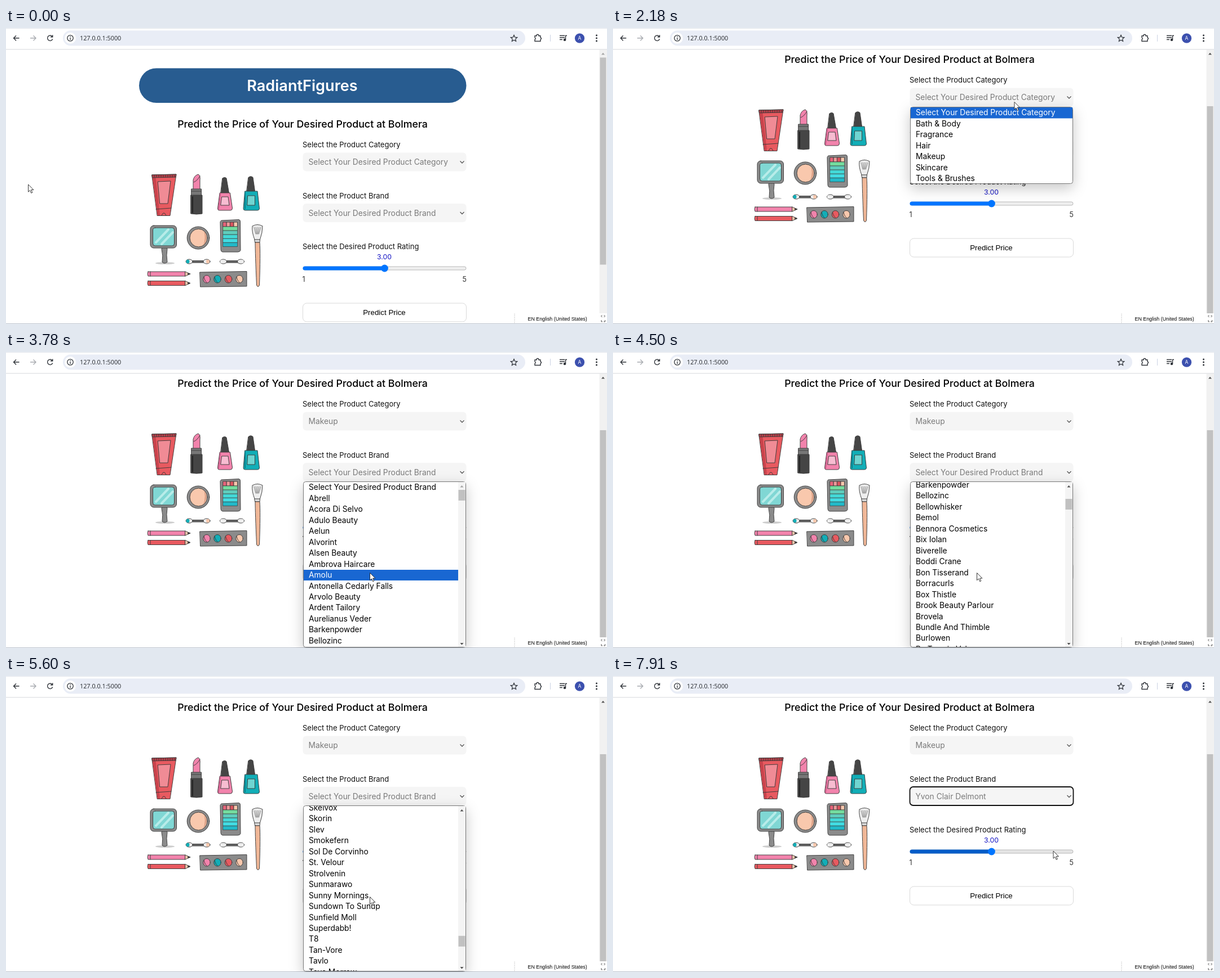
Write an HTML page that moves like this. It is 1066 px wide and 526 px high and loops after 8 s.

```html
<!DOCTYPE html>
<html lang="en">
<head>
<meta charset="utf-8">
<title>Price predictor</title>
<style>
html, body { margin: 0; width: 100%; height: 100%; overflow: hidden; background: #fff; }
svg { position: fixed; left: 0; top: 0; width: 100%; height: 100%; display: block; }
text { font-family: Inter, "Open Sans", sans-serif; fill: #111; white-space: pre; }
.label { font-size: 13px; }
.pick { font-size: 13.8px; fill: #7a7a7a; }
.item { font-size: 13.8px; fill: #000; }
.item.on { fill: #fff; }
.arial { font-family: "Liberation Sans", Arial, sans-serif; fill: #000; }
.ink { stroke: #3c3c3c; stroke-width: .95; stroke-linejoin: round; stroke-linecap: round; }
.icon { fill: none; stroke: #30343a; stroke-width: 1.4; }
.pop { filter: drop-shadow(0 8px 12px rgba(0,0,0,.22)); }
</style>
</head>
<body>
<svg id="stage" viewBox="0 0 1066 526" preserveAspectRatio="none"></svg>
<script>
const LOOP = 8000, ROW = 19.46, COUNT = 221, BLUE = '#1967d2';
const stage = document.getElementById('stage');
const $ = id => document.getElementById(id);

const rect = (x, y, w, h, fill, more = '') =>
  `<rect x="${x}" y="${y}" width="${w}" height="${h}" fill="${fill}" ${more}/>`;
const path = (d, fill = 'none', more = '') => `<path d="${d}" fill="${fill}" ${more}/>`;
const oval = (x, y, rx, ry, fill, more = '') =>
  `<ellipse cx="${x}" cy="${y}" rx="${rx}" ry="${ry}" fill="${fill}" ${more}/>`;
const text = (x, y, s, more = '') => `<text x="${x}" y="${y}" ${more}>${s}</text>`;

// ---- names in the lists ----
const cats = ['Select Your Desired Product Category', 'Bath &amp; Body', 'Fragrance', 'Hair',
  'Makeup', 'Skincare', 'Tools &amp; Brushes'];
const head = ('Select Your Desired Product Brand,Abrell,Acora Di Selvo,Adulo Beauty,Aelun,Alvorint,' +
  'Alsen Beauty,Ambrova Haircare,Amolu,Antonella Cedarly Falls,Arvolo Beauty,Ardent Tailory,' +
  'Aurelianus Veder,Barkenpowder,Bellozinc,Bellowhisker,Bemol,Bennora Cosmetics,Bix Iolan,' +
  'Biverelle,Boddi Crane,Bon Tisserand,Borracurls,Box Thistle,Brook Beauty Parlour,Brovela,' +
  'Bundle And Thimble,Burlowen,By Tamsin Vale').split(',');
const middle = ('Skelvox,Skorin,Slev,Smokefern,Sol De Corvinho,St. Velour,Strolvenin,Sunmarawo,' +
  'Sunny Mornings,Sundown To Sunup,Sunfield Moll,Superdabb!,T8,Tan-Vore,Tavlo,Tava Morrow').split(',');
const tail = ('Torvelle,Tulva Hair,Ulmera,Umbrel Skin,Varnelle,Velunda,Vistro Beauty,Wendrow,' +
  'Whitlow Fern,Wilmere,Xandrel,Yarrowin,Yelmora,Youngfell Labs,Yvon Clair Delmont').split(',');
const MID = 179, TAIL = COUNT - tail.length;

function brand(i) {
  if (i < head.length) return head[i];
  if (i >= TAIL) return tail[i - TAIL] || '';
  if (i >= MID && i < MID + middle.length) return middle[i - MID];
  const letter = i < MID ? String.fromCharCode(67 + Math.floor((i - 29) / 150 * 17)) : 'T';
  return letter + 'aeou'[i * 7 % 4] + ['lv', 'rsk', 'ndr', 'mbl', 'xt'][i * 3 % 5] +
    ['ane', 'ilo', 'ume', 'ora', 'eth', 'y'][i * 5 % 6] + (i % 4 ? '' : ' Beauty');
}

// ---- drawing of the cosmetics ----
function cosmetics() {
  const pink = '#f283ac', red = '#e85a60', teal = '#12aeb7', grey = '#8b8b8b', dark = '#454545', peach = '#f9c8ad';
  let s = '';
  // tube
  s += path('M259 261L302 260 291 333.5H268.500Z', red) +
    path('M259 261L265 261 273 333H268.500Z', '#c9434c', 'stroke="none"') +
    path('M259 261L302 260 301 265 260 266Z', '#b93e48');
  for (let x = 263; x < 300; x += 4) s += path(`M${x} 261.500v3.500`);
  s += path('M269.500 273L292 272 287 312H273Z', '#f08b95') + path('M266 322L293 320M276 333q4-9 8 0');
  // lipstick
  s += path('M332 287V270Q334 262 341 260Q345 262 344 270V287Z', pink) +
    path('M333 274Q339 272 344 263') +
    path('M329 286H346.500V298H329Z', '#777') + path('M328 297H348V330Q338 332 328 330Z', dark) +
    path('M331 300V328', 'none', 'style="stroke:#222;stroke-width:2"') + path('M329 290H346');
  // nail polish
  s += path('M384 267Q388 264 391 267L395.500 293H381Z', dark) +
    path('M379.500 293H397.500L401.500 320Q401.500 324 398 324H378.500Q375 324 375.500 320Z', pink) +
    path('M380 294L377 322', 'none', 'style="stroke:#c75c88;stroke-width:2"') +
    path('M383 300H394L396 315H381Z', '#f7bcd1');
  s += path('M430 265.500Q434 262 438 265.500L441.500 290H427Z', dark) +
    path('M424 290H446L449.500 321Q449 324 446 324H424Q421 324 421 321Z', teal) +
    path('M424 292V321', 'none', 'style="stroke:#087f8a;stroke-width:2"') +
    path('M429 298H441.500V315H428Z', '#70d5d1');
  // mirror
  s += oval(282, 418, 17, 2, '#ccc', 'stroke="none"') +
    path('M277 388L276 393Q279 405 277 416Q281 420 286 416Q284 403 286 393L285 388Z', grey) +
    rect(256, 351, 46.5, 40, grey, 'rx="6"') + rect(260.5, 355, 38, 32, '#80d7d4', 'rx="4"') +
    path('M266 381L288 358M276 384L296 363', 'none', 'style="stroke:#b8ece9;stroke-width:4"');
  // compact
  s += oval(341, 373, 19.8, 20, grey) + oval(341.5, 373, 15.5, 16, peach) +
    path('M351 361Q360 373 350 386Q355 373 351 361Z', '#d99d83', 'stroke="none"');
  // shade card
  s += path('M382 342L413 340.500Q416 341 415.500 345L416 395Q415 398 411 398H384Q381 397 381 394L380 345Z', grey);
  ['#e7647b', '#ef9a9a', '#d9555f', peach].forEach((c, i) => s += rect(385 + i * 6.4, 345, 6.4, 8, c));
  ['#74dd9f', '#5fcdbd', '#43d9d7', '#42dbe2', '#22b9c8'].forEach((c, i) =>
    s += rect(385, 353 + i * 7.1, 25.6, 7.1, c, 'stroke-width=".7"'));
  // brush
  s += path('M441 376Q435.500 362 437 352Q446 347 455 352Q455 364 450.500 376Z', '#eee');
  for (let i = 0; i < 5; i++) s += path(`M${440 + i * 3} 354L${443 + i * 1.3} 366`, 'none', 'stroke-width=".6"');
  s += path('M441 376H450.500L450 381H442Z', '#ddd') +
    path('M442 381H450Q451.500 400 449.500 457Q447 462 444.500 457Q442 400 442 381Z', '#f0b797');
  // applicators
  [[319, teal, peach], [379.5, '#eee', '#eee']].forEach(([x, a, b]) =>
    s += path(`M${x + 10} 413.500H${x + 33}V417H${x + 10}Z`, '#666') +
      oval(x + 6, 415, 6, 4, '#eee') + oval(x + 37, 415, 6, 4, '#eee') +
      oval(x + 3.5, 415, 3, 3.2, a, 'stroke="none"') + oval(x + 39, 415, 3, 3.2, b, 'stroke="none"'));
  // pencils
  [[433, pink], [449.500, red]].forEach(([y, c]) =>
    s += path(`M252 ${y}H318V${y + 8}H252Q250 ${y + 4} 252 ${y}Z`, c) +
      path(`M318 ${y}L326.500 ${y + 4}L318 ${y + 8}Z`, peach) +
      path(`M323 ${y + 2.500}L327 ${y + 4}L323 ${y + 5.500}Z`, dark) + path(`M256 ${y}V${y + 8}`));
  // eye shadows
  s += path('M344 434L427 432.500V459L345 460Z', grey);
  [[356, pink], [375, teal], [394.500, red], [414, peach]].forEach(([x, c]) =>
    s += oval(x, 446.3, 6.3, 6.8, c) + path(`M${x - 5} 442Q${x - 4} 449 ${x} 452`));
  return `<g class="ink">${s}</g>`;
}

// ---- page parts ----
function select(id, y, label) {
  return text(526, y - 9.5, label, 'class="label"') +
    rect(526.5, y, 290, 33, '#f5f5f5', `rx="6" id="${id}Box"`) +
    text(536.500, y + 21.5, '', `class="pick" id="${id}"`) +
    path(`M805.500 ${y + 15}l3.500 3.500 3.500-3.500`, 'none', 'stroke="#555" stroke-width="1.300"');
}

function page() {
  return rect(236, 71.5, 580.5, 61.5, '#285c90', 'rx="30.750"') +
    text(525.5, 112, 'RadiantFigures', 'font-size="27.100" font-weight="600" text-anchor="middle" style="fill:#fff"') +
    text(526, 177, 'Predict the Price of Your Desired Product at Bolmera',
      'font-size="17.800" font-weight="500" text-anchor="middle" style="fill:#000"') +
    cosmetics() +
    select('cat', 221.5, 'Select the Product Category') +
    select('brand', 312, 'Select the Product Brand') +
    text(526, 393, 'Select the Desired Product Rating', 'class="label"') +
    text(671, 410.8, '3.00', 'font-size="12.300" text-anchor="middle" style="fill:#1414c4"') +
    rect(527, 424, 289, 6, '#efefef', 'rx="3" stroke="#b2b2b2" stroke-width=".900" id="track"') +
    rect(526.5, 423.5, 145, 7, '#0075ff', 'rx="3.500" id="fill"') +
    oval(671.5, 427, 6.4, 6.4, '#0075ff') +
    text(525.5, 451, '1', 'font-size="12.500" style="fill:#333"') +
    text(817, 451, '5', 'font-size="12.500" text-anchor="end" style="fill:#333"') +
    rect(526.5, 489, 290, 33, '#fff', 'rx="7" stroke="#d9d9d9"') +
    text(671, 510, 'Predict Price', 'class="arial" font-size="13.330" text-anchor="middle"');
}

function toolbar() {
  const dots = [13, 18, 23].map(y => oval(1047.5, y, 1.5, 1.5, '#30343a')).join('');
  return rect(0, 0, 1066, 38, '#fff') + rect(0, 0, 1066, 1, '#dfe3ea') + rect(0, 37.5, 1066, 1, '#d6d8dc') +
    rect(101, 4.5, 820, 27, '#e9edf6', 'rx="13.500"') + oval(114, 18, 10, 10, '#fff') +
    '<g class="icon">' +
    path('M23.500 18H13.500M18 13.500L13.500 18L18 22.500') +
    path('M43 18H53M48.500 13.500L53 18L48.500 22.500', 'none', 'stroke="#a8abb0"') +
    path('M82 15A4.700 4.700 0 1 0 82.700 19.500M82.700 12.500V16H79') +
    oval(114, 18, 5.2, 5.2, 'none', 'stroke-width="1.300"') + path('M114 17.500V21M114 14.800V16.200') +
    path('M901 12.500L902.700 16.400L906.800 16.800L903.700 19.500L904.600 23.500L901 21.400L897.400 23.500L898.300 19.500L895.200 16.800L899.300 16.400Z', 'none', 'stroke-width="1.200"') +
    path('M938 14H941V12.500Q943 10.500 945 12.500V14H948V17Q951 18.500 948 20.500V23.500H938V20.500Q940.500 18.700 938 17Z') +
    path('M982 13.500H991M982 17H991M982 20.500H987M992.500 21V13.500H995') + oval(991, 21, 1.6, 1.6, '#30343a') +
    '</g>' + rect(965, 12, 1, 12, '#cbd3e4') + oval(1017.5, 18.2, 8.6, 8.6, '#3c50ae') +
    text(1017.5, 21.3, 'A', 'font-size="8.500" text-anchor="middle" style="fill:#fff"') + dots +
    text(131, 22, '127.0.0.1:5000', 'font-size="10.800" style="font-family:\'Open Sans\',sans-serif;fill:#24272b"');
}

function scrollbar() {
  return rect(1052.5, 38.5, 13.5, 487, '#f1f1f1') +
    path('M1056 47.500L1059 44L1062 47.500Z', '#505050', 'id="pageUp"') +
    rect(1053.5, 52.5, 11, 368, '#c1c1c1', 'id="pageThumb"');
}

function langBar() {
  return rect(900, 507, 166, 18, '#fff') +
    path('M902 508V525', 'none', 'stroke="#999" stroke-dasharray="1 2"') +
    text(925.5, 519.5, 'EN English (United States)', 'class="arial" font-size="8.850"') +
    path('M1057.500 510L1055.500 512L1057.500 514M1060.500 510L1062.500 512L1060.500 514M1056 519V522H1058M1060 522H1062.500V519',
      'none', 'stroke="#444" stroke-width=".900"') +
    rect(0, 525, 1066, 1, '#b9c1cc');
}

function popups() {
  const frame = (y, h) => rect(527.5, y, 288, h, '#fff', 'rx="4" stroke="#777" class="pop"');
  const catRows = cats.map((c, i) => text(537, Math.round(155.4 + i * ROW), c, 'class="item"')).join('');
  const rows = Array.from({ length: 17 }, () => text(537, 0, '', 'class="item"')).join('');
  return `<g id="catPop">${frame(140.5, 136)}${rect(528, 141, 287, 19.5, BLUE, 'id="catBar"')}
      <g id="catRows">${catRows}</g></g>
    <g id="brandPop">${frame(230.5, 294)}
      <g clip-path="url(#view)">${rect(528, 231, 274, 19, BLUE, 'id="brandBar"')}<g id="brandRows">${rows}</g></g>
      ${rect(802, 231, 13, 293, '#f4f4f4')}
      ${path('M805.500 240.500L808.500 237L811.500 240.500Z', '#505050', 'id="listUp"')}
      ${path('M805.500 517L808.500 520.500L811.500 517Z', '#505050')}
      ${rect(802.5, 245, 12, 19, '#c1c1c1', 'id="listThumb"')}</g>`;
}

stage.innerHTML = `<defs><clipPath id="view">${rect(528, 231, 274, 293, '#000')}</clipPath></defs>` +
  rect(0, 0, 1066, 526, '#fff') + `<g id="page">${page()}</g>` + scrollbar() + langBar() + popups() + toolbar() +
  path('M0 0V13.200L3 10.400L5.200 15.300L7.300 14.400L5.200 9.600H9.400Z', '#fff',
    'id="cursor" stroke="#222" stroke-width=".900" stroke-linejoin="round"');

// ---- motion: moves advance in n equal ticks, the first at t0, the last at t1 ----
function ticks(t, t0, t1, n) {
  if (t < t0) return 0;
  if (t >= t1) return 1;
  return (Math.floor((t - t0) / (t1 - t0) * (n - 1) + .12) + 1) / n;
}
const smooth = p => p * p * (3 - 2 * p);

const moves = [
  [260, 260, 1, 38.5, 355.5],
  [1630, 1940, 5, 712, 131.5],
  [2430, 2830, 6, 663, 226],
  [3220, 3300, 2, 637.5, 215.5],
  [3630, 3780, 3, 645.5, 392.5],
  [6100, 6720, 9, 612, 510],
  [7140, 7520, 6, 807, 250],
  [7600, 7910, 5, 781, 311]
];

function cursorAt(t) {
  let x = 39.5, y = 278;
  for (const [t0, t1, n, tx, ty] of moves) {
    const p = smooth(ticks(t, t0, t1, n));
    x += (tx - x) * p;
    y += (ty - y) * p;
  }
  return [x, y];
}

function pageScroll(t) {
  const p = ticks(t, 590, 740, 3);
  return t >= 1400 ? 115 : 100 * (1 - (1 - p) ** 1.5);
}

const listScroll = t => 257.4 * smooth(ticks(t, 4120, 4500, 6)) +
  3232.4 * smooth(ticks(t, 4820, 5600, 11)) + 518.2 * ticks(t, 5690, 5760, 2);

const set = (id, name, v) => $(id).setAttribute(name, v);
const show = (id, on) => set(id, 'visibility', on ? 'visible' : 'hidden');

function ring(id, on) {
  set(id, 'stroke', on ? '#111' : 'none');
  set(id, 'stroke-width', 1.8);
}

function draw(t) {
  const [cx, cy] = cursorAt(t), scroll = pageScroll(t);
  const catOpen = t >= 2110 && t < 2980, brandOpen = t >= 3460 && t < 6880;
  set('cursor', 'transform', `translate(${cx} ${cy})`);
  set('page', 'transform', `translate(0 ${-scroll})`);
  set('pageThumb', 'y', 52.5 + scroll * .752);
  set('pageUp', 'fill', scroll ? '#505050' : '#a3a3a3');

  $('cat').textContent = t >= 2980 ? 'Makeup' : cats[0];
  $('brand').textContent = t >= 6880 ? tail[tail.length - 1] : head[0];
  ring('catBox', t >= 2980 && t < 3460);
  ring('brandBox', t >= 6880);

  const hover = t > 6880 && cx > 527 && cx < 817 && cy > 304 && cy < 320;
  set('fill', 'fill', hover ? '#005cc8' : '#0075ff');
  set('track', 'fill', hover ? '#e5e5e5' : '#efefef');

  show('catPop', catOpen);
  const cat = Math.max(0, Math.min(6, Math.floor((cy - 141) / ROW)));
  set('catBar', 'y', Math.round(141 + cat * ROW));
  [...$('catRows').children].forEach((el, i) => el.classList.toggle('on', i === cat));

  show('brandPop', brandOpen);
  const off = listScroll(t), first = Math.floor(off / ROW);
  const idle = t >= 4120 && t < 6100;
  const pick = idle ? -1 : Math.max(0, Math.min(COUNT - 1, Math.floor((cy - 231 + off) / ROW)));
  set('brandBar', 'y', idle ? -50 : Math.round(231 + pick * ROW - off));
  [...$('brandRows').children].forEach((el, k) => {
    const i = first + k;
    el.textContent = brand(i);
    el.setAttribute('y', Math.round(245.4 + i * ROW - off));
    el.classList.toggle('on', i === pick);
  });
  set('listThumb', 'y', 245 + off / 16.1);
  set('listUp', 'fill', off ? '#505050' : '#a3a3a3');
}

const start = performance.now();
function tick() {
  draw((performance.now() - start) % LOOP);
  requestAnimationFrame(tick);
}
draw(0);
requestAnimationFrame(tick);
</script>
</body>
</html>
```
